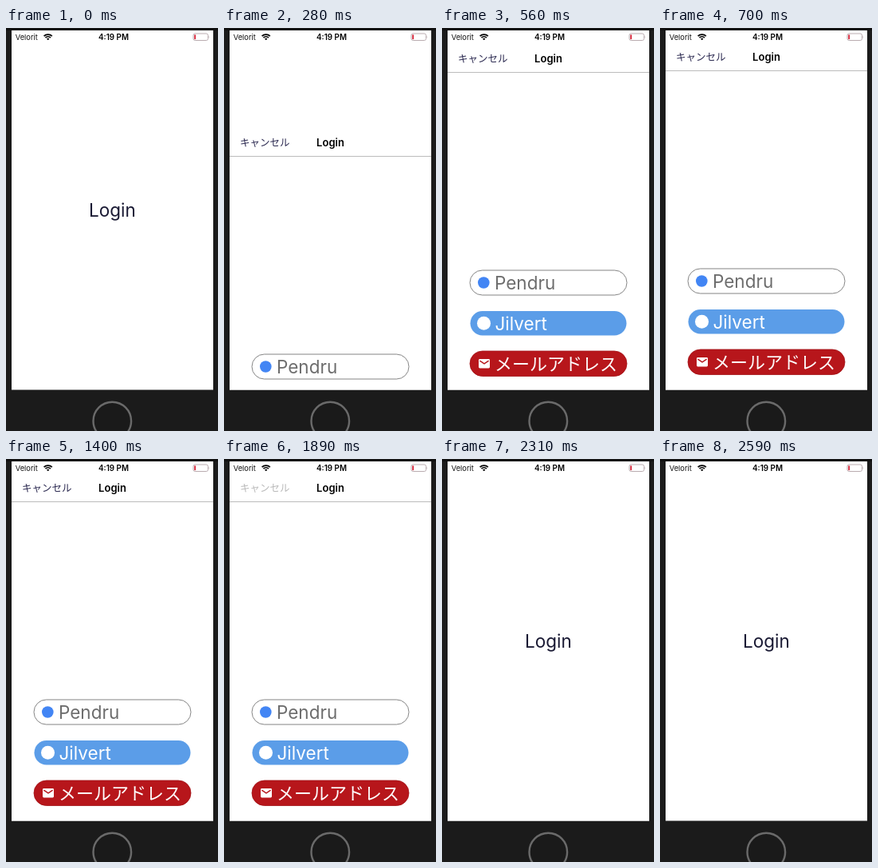
Recreate the animation shown at these times as an HTML page. Size 266 px wide and 504 px high, loop 3290 ms.

```html
<!DOCTYPE html>
<html lang="ja">
<head>
<meta charset="utf-8">
<title>Login sheet</title>
<style>
  html, body { margin: 0; width: 100%; height: 100%; overflow: hidden; background: #1b1b1b; }
  svg { display: block; width: 266px; height: 504px; font-family: Inter, "Liberation Sans", sans-serif; }
  .jp { font-family: "Noto Sans CJK JP", "Noto Sans CJK", sans-serif; }
  .mid { text-anchor: middle; }
  .label { font-size: 22.5px; }
  #cancel { fill: #2b2950; font-size: 12.5px; }
  #cancel.pressed { fill: #b9b9b9; }
</style>
</head>
<body>
<svg viewBox="0 0 266 504">
  <defs>
    <clipPath id="screen"><rect x="7" y="3" width="253" height="449.5"/></clipPath>
  </defs>

  <!-- Phone body -->
  <rect width="266" height="504" fill="#1b1b1b"/>
  <rect width="266" height="3" fill="#101010"/>
  <circle cx="133.3" cy="491.5" r="23.8" fill="#1a1a1a" stroke="#6a6a6a" stroke-width="2.4"/>

  <g clip-path="url(#screen)">
    <rect x="7" y="3" width="253" height="450" fill="#fff"/>
    <text class="mid label" x="133.5" y="236" fill="#191933">Login</text>

    <g id="sheet" transform="translate(0 450)">
      <rect x="7" y="3" width="253" height="450" fill="#fff"/>
      <text id="cancel" class="jp" x="20" y="41">キャンセル</text>
      <text class="mid" x="133.5" y="41" font-size="13" font-weight="600">Login</text>
      <path d="M7 53.5H260" stroke="#bcbcbc"/>

      <rect x="35" y="301" width="197" height="31" rx="15.5" fill="#fff" stroke="#777" stroke-width=".9"/>
      <circle cx="52.3" cy="316.5" r="7.3" fill="#4285f4"/>
      <text class="label" x="66" y="325" fill="#6d6d6d">Pendru</text>

      <rect x="35.5" y="352" width="196" height="30.5" rx="15.2" fill="#5b9de8"/>
      <circle cx="52.5" cy="367.3" r="8.5" fill="#fff"/>
      <text class="label" x="66.5" y="375.5" fill="#fff">Jilvert</text>

      <rect x="35" y="402" width="197" height="31.5" rx="15.7" fill="#b7161b" stroke="#a31217" stroke-width=".8"/>
      <rect x="46" y="412" width="14" height="11.5" rx="1.4" fill="#fff"/>
      <path d="M47.4 414.2L53 417.8L58.6 414.2" fill="none" stroke="#b7161b" stroke-width="1.4"/>
      <text class="jp" x="66" y="426" font-size="22" font-weight="300" fill="#fff">メールアドレス</text>
    </g>

    <!-- Status bar -->
    <text x="11.7" y="14.5" font-size="9.3" fill="#111">Velorit</text>
    <g fill="none" stroke="#000" stroke-width="1.7">
      <path d="M47.6 10.2A7.2 7.2 0 0 1 57.8 10.2"/>
      <path d="M49.5 12.1A4.5 4.5 0 0 1 55.9 12.1"/>
    </g>
    <path d="M51 13.5A2.4 2.4 0 0 1 54.4 13.5L52.7 15.2Z"/>
    <text class="mid" x="135" y="14.7" font-size="9.8" font-weight="600">4:19 PM</text>
    <rect x="235" y="7" width="18.5" height="8.5" rx="2.2" fill="#fff" stroke="#b3a3a8" stroke-width=".9"/>
    <rect x="236.2" y="8.3" width="1.9" height="5.9" rx=".8" fill="#d8283c"/>
    <path d="M254.6 9.8Q256.2 11.2 254.6 12.8Z" fill="#b3a3a8"/>
  </g>
</svg>
<script>
  const LOOP = 3290, STEP = 70, TRAVEL = 450;
  const sheet = document.getElementById('sheet');
  const cancel = document.getElementById('cancel');

  // Critically damped spring: the share of the way still to go.
  function rest(ms) {
    const x = Math.max(0, ms) * 0.0176;
    return (1 + x) * Math.exp(-x);
  }

  function offset(t) {
    if (t < 210 || t >= 2380) return TRAVEL;
    if (t < 2030) return TRAVEL * rest(t - 123);
    return TRAVEL * (1 - rest(t - 2015));
  }

  const start = performance.now();

  function draw(now) {
    const time = Math.max(0, now - start) % LOOP;
    const t = Math.floor(time / STEP) * STEP;
    sheet.setAttribute('transform', `translate(0 ${Math.round(offset(t))})`);
    cancel.classList.toggle('pressed', t >= 1820);
    requestAnimationFrame(draw);
  }
  requestAnimationFrame(draw);
</script>
</body>
</html>
```
